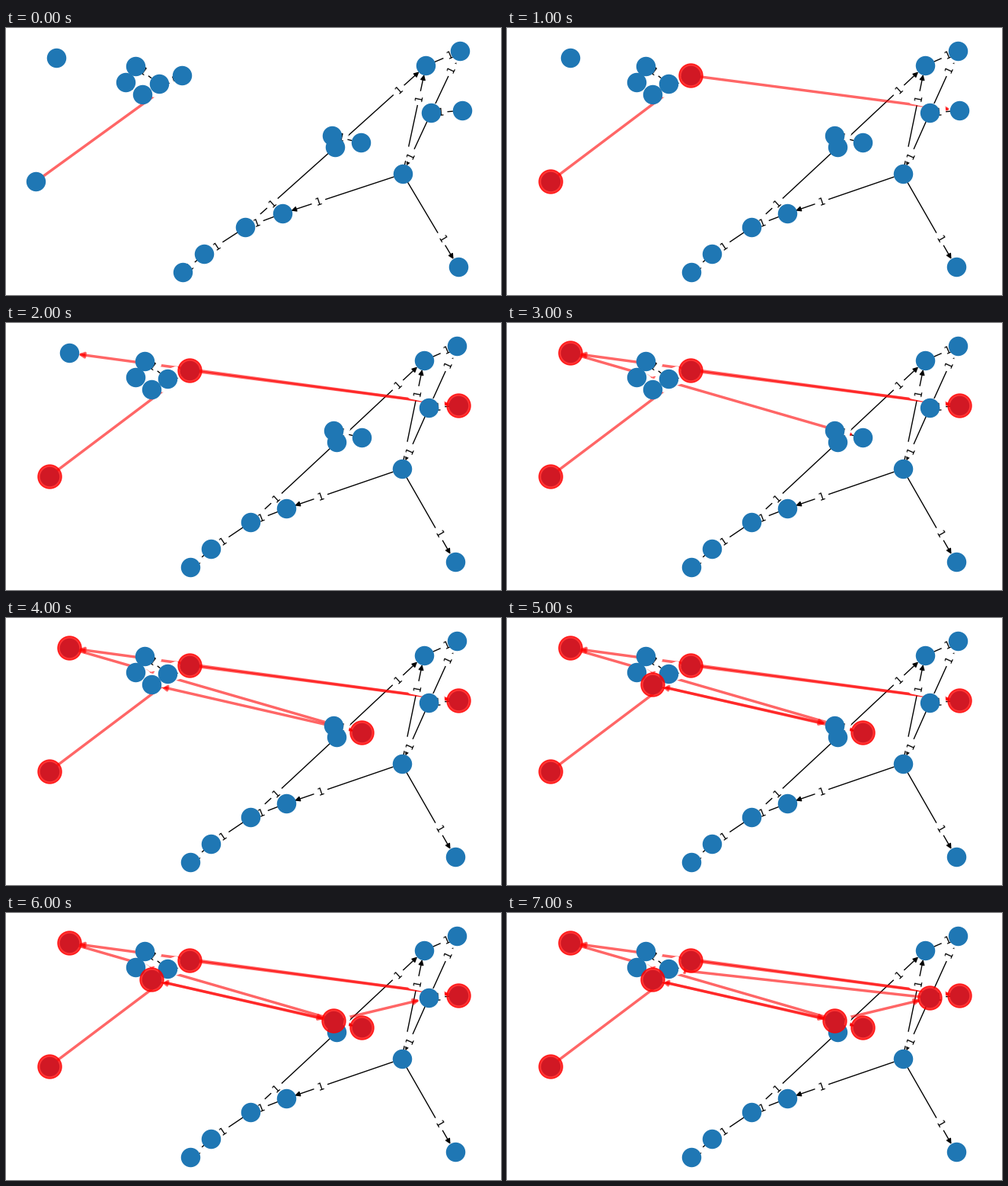
A matplotlib script for the animation above (8000 ms loop, 650 by 350 pixels).

```python
import math

import matplotlib.pyplot as plt
from matplotlib.animation import FuncAnimation
from matplotlib.patches import FancyArrowPatch

W, H, DPI = 650, 350, 100
STEPS, STEP_MS = 8, 1000
NODE_SIZE, VISITED_SIZE = 300, 500
LABEL_AT = 0.7  # share of the way from source to target

NODES = {
    "A": (82.2, 39), "B": (182.1, 50), "C": (169.8, 71), "D": (212, 73),
    "E": (191, 87), "F": (241, 62), "G": (56.3, 201), "H": (430, 141),
    "I": (434, 156), "J": (466.3, 150), "K": (548.6, 49), "L": (591.8, 30),
    "M": (555, 111), "N": (593.8, 108), "O": (519.3, 191), "P": (367.4, 243),
    "Q": (320.8, 261), "R": (268.8, 296), "S": (242, 320), "T": (589.2, 313),
}
EDGES = ["ED", "EC", "DB", "FD", "JH", "IQ", "IK", "KL", "NM", "ML",
         "MO", "OK", "OT", "OP", "PQ", "QR", "RS"]
WALK = "GFNAJEHMD"

fig = plt.figure(figsize=(W / DPI, H / DPI), dpi=DPI, facecolor="white")
ax = fig.add_axes([0, 0, 1, 1])


def layout(step):
    """Node positions; the view is a little wider before any node is marked."""
    if step:
        return NODES
    return {n: ((x - 18.9) / 0.961, y) for n, (x, y) in NODES.items()}


def draw_edge(start, end, **style):
    gap = math.sqrt(NODE_SIZE) / 2
    ax.add_patch(FancyArrowPatch(start, end, arrowstyle="-|>",
                                 mutation_scale=10, shrinkA=gap, shrinkB=gap,
                                 zorder=1, **style))


def draw_label(start, end):
    dx, dy = end[0] - start[0], end[1] - start[1]
    angle = math.degrees(math.atan2(-dy, dx))
    if angle > 90:
        angle -= 180
    elif angle < -90:
        angle += 180
    ax.text(start[0] + LABEL_AT * dx, start[1] + LABEL_AT * dy, "1",
            size=10, family="DejaVu Sans", color="black", rotation=angle,
            ha="center", va="center", zorder=1,
            bbox=dict(boxstyle="round", ec="white", fc="white"))


def draw_nodes(points, size, **style):
    xs, ys = zip(*points)
    ax.scatter(xs, ys, s=size, linewidths=1, zorder=2, **style)


def update(step):
    ax.clear()
    ax.set(xlim=(-0.3, W - 0.3), ylim=(H - 0.3, -0.3))
    ax.axis("off")
    pos = layout(step)

    for a, b in EDGES:
        draw_edge(pos[a], pos[b], color="black", lw=1)
    for a, b in zip(WALK[:step + 1], WALK[1:step + 2]):
        draw_edge(pos[a], pos[b], color="red", lw=2.5, alpha=0.6)
    for a, b in EDGES:
        draw_label(pos[a], pos[b])

    draw_nodes(pos.values(), NODE_SIZE, color="#1f77b4")
    if step:
        visited = [pos[n] for n in WALK[:step + 1]]
        draw_nodes(visited, VISITED_SIZE, color="red", alpha=0.8)
    return []


anim = FuncAnimation(fig, update, frames=STEPS, interval=STEP_MS,
                     repeat=True, repeat_delay=0)
plt.show()
```
